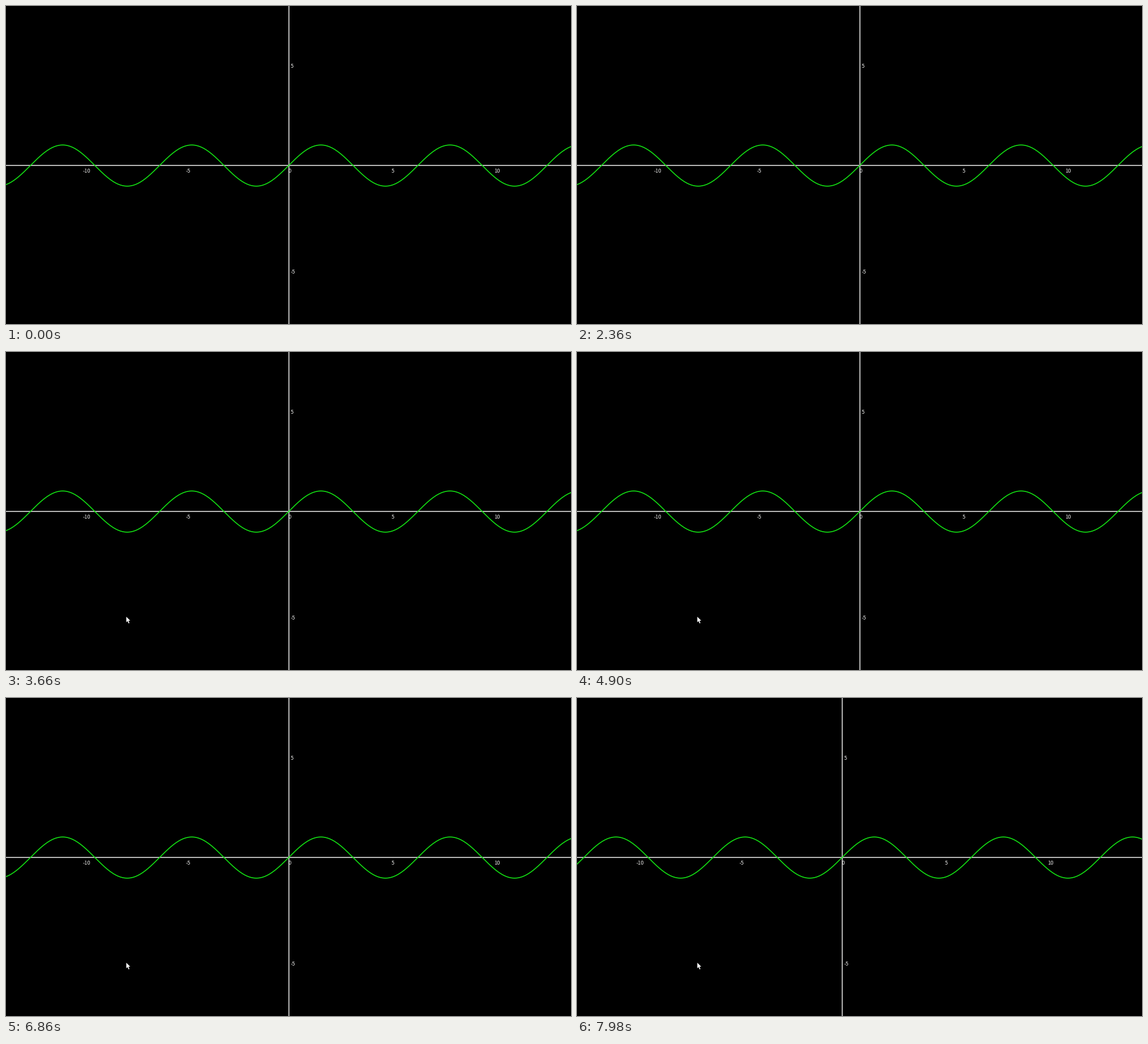
A matplotlib script for the animation above (8000 ms loop, 998x561 px).

```python
import numpy as np
import matplotlib.pyplot as plt
from matplotlib.animation import FuncAnimation
from matplotlib.patches import Polygon

W, H, DPI = 998, 561, 100
STEP, LOOP = 20, 8000
PX = 72 / DPI                     # points per pixel
ORIGIN_X, ORIGIN_Y = 499.7, 281.3
UNIT = 36.3                       # pixels per unit
PAN_TIME, PAN = 6980, -31.2
POINTER_TIME = 2400
WHITE, GREEN = "#ebebea", "#14e614"

fig = plt.figure(figsize=(W / DPI, H / DPI), dpi=DPI, facecolor="black")
ax = fig.add_axes([0, 0, 1, 1])
ax.set_xlim(0, W)
ax.set_ylim(H, 0)
ax.axis("off")


def stroke(xs, ys, color, width):
    line, = ax.plot(xs, ys, color=color, lw=width * PX, snap=False)
    return line


def label(x, y, value):
    text = ax.text(x, y, str(value), color=WHITE, fontsize=9.3 * PX,
                   family="Noto Sans CJK JP", ha="left", va="baseline",
                   zorder=4)
    return text, x


def arrow():
    """Pointer outline: half an arrow, mirrored and turned to lean left."""
    half = np.array([0, 9.05 + 3.75j, 8.1 + 0.85j, 12.4 + 0.85j])
    outline = np.concatenate([half, half[::-1].conj()])
    outline = outline * np.exp(3j * np.pi / 8)
    return np.column_stack([outline.real, outline.imag])


def ease_out(t, start, length):
    k = np.clip((t - start) / length, 0, 1)
    return 1 - (1 - k) ** 2


def pointer_tip(t):
    glide = ease_out(t, 2480, 60)
    nudge = ease_out(t, 3360, 40)
    return 256.5 - 47 * glide + 3 * nudge, 453 + 14 * glide


stroke([-2, W + 2], [ORIGIN_Y] * 2, WHITE, 1.6)
y_axis = stroke([ORIGIN_X] * 2, [-2, H + 2], WHITE, 1.6)
xs = np.linspace(-2, W + 2, 1005)
wave = stroke(xs, xs, GREEN, 1.6)

labels = [label(ORIGIN_X - 0.7 + n * UNIT, ORIGIN_Y + 12.5, n)
          for n in range(-10, 11, 5)]
labels += [label(ORIGIN_X + 2.8, ORIGIN_Y - n * UNIT + 9.1, n)
           for n in (5, -5)]

shape = arrow()
pointer = Polygon(shape, closed=True, facecolor="white", edgecolor="none",
                  zorder=5)
ax.add_patch(pointer)


def update(i):
    t = i * STEP
    shift = PAN if t >= PAN_TIME else 0
    x0 = ORIGIN_X + shift
    y_axis.set_xdata([x0, x0])
    # The curve sits a fraction of a pixel left of and below the axes
    wave.set_ydata(ORIGIN_Y + 0.2 - UNIT * np.sin((xs - x0 + 0.5) / UNIT))
    for text, x in labels:
        text.set_x(x + shift)
    pointer.set_visible(t >= POINTER_TIME)
    pointer.set_xy(shape + pointer_tip(t))
    return [y_axis, wave, pointer] + [text for text, _ in labels]


anim = FuncAnimation(fig, update, frames=LOOP // STEP, interval=STEP,
                     repeat=True, repeat_delay=0, blit=False)
plt.show()
```
